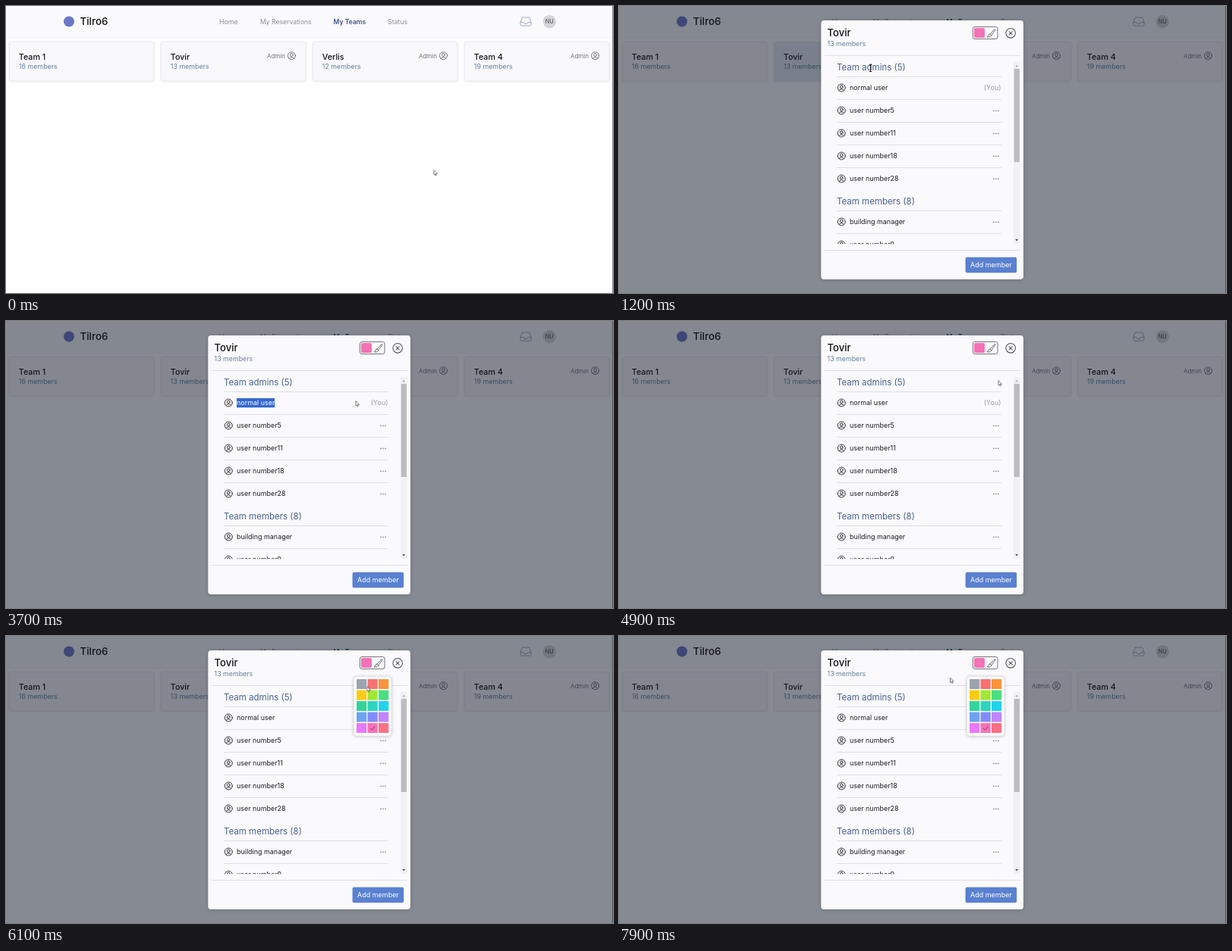
Write an HTML page with a canvas that moves like this. It is 800 px wide and 379 px high and loops after 8 s.

```html
<!DOCTYPE html>
<html lang="en">
<head>
<meta charset="utf-8">
<title>Teams</title>
<style>
html, body { margin: 0; width: 100%; height: 100%; overflow: hidden; background: #fefdff; }
canvas { display: block; width: 100vw; height: 100vh; }
</style>
</head>
<body>
<canvas id="stage"></canvas>
<script>
const W = 800, H = 379, LOOP = 8000, STEP = 100;
const OPEN = 1200, PICKER = 5700, SELECT = [2000, 4000];
const INK = '#111', MUTED = '#64809f', HEADING = '#48608f';
const canvas = document.getElementById('stage');
const ctx = canvas.getContext('2d');
const ratio = window.devicePixelRatio || 1;
canvas.width = W * ratio;
canvas.height = H * ratio;

// time, x, y, pointer shape
const path = [
  [0, 564, 217, 'arrow'], [100, 564, 217, 'arrow'], [1000, 331.7, 80, 'arrow'],
  [1100, 331.7, 80, 'hand'], [1200, 331.5, 82, 'beam'], [1500, 322, 95, 'arrow'],
  [1900, 301, 107, 'beam'], [2700, 490, 106, 'arrow'], [2900, 490, 106, 'arrow'],
  [3300, 453, 107, 'arrow'], [3700, 461, 106, 'arrow'], [3800, 462, 106, 'arrow'],
  [4400, 493, 96, 'arrow'], [4500, 493, 96, 'arrow'], [4900, 500, 79, 'arrow'],
  [5400, 488, 37, 'hand'], [5700, 488, 37, 'hand'], [5900, 482, 55, 'arrow'],
  [6100, 476, 67, 'arrow'], [6300, 472, 76, 'arrow'], [6600, 497, 82, 'arrow'],
  [6900, 468, 110, 'arrow'], [7200, 484, 90, 'arrow'], [7800, 436.5, 55.5, 'arrow'],
  [8000, 436.5, 55.5, 'arrow']
];
const cards = [['Team 1', 16, false], ['Tovir', 13, true], ['Verlis', 12, true], ['Team 4', 19, true]];
const admins = ['normal user', 'user number5', 'user number11', 'user number18', 'user number28'];
const swatches = [
  '#9ca3af', '#f87171', '#fb923c', '#facc15', '#a3e635', '#4ade80', '#34d399', '#2dd4bf',
  '#22d3ee', '#6ea3f2', '#818cf8', '#c084fc', '#e879f9', '#f472b6', '#fb7185'
];

function text(str, x, y, size, color, weight = 400, align = 'left') {
  ctx.font = `${weight} ${size}px Inter, "Open Sans", sans-serif`;
  ctx.textAlign = align;
  ctx.fillStyle = color;
  ctx.fillText(str, x, y);
}

function box(x, y, w, h, r, fill, stroke) {
  ctx.beginPath();
  ctx.roundRect(x, y, w, h, r);
  if (fill) { ctx.fillStyle = fill; ctx.fill(); }
  if (stroke) { ctx.strokeStyle = stroke; ctx.lineWidth = 1; ctx.stroke(); }
}

function shadowBox(x, y, w, h, r, fill, blur, alpha) {
  ctx.save();
  ctx.shadowColor = `rgba(0,0,0,${alpha})`;
  ctx.shadowBlur = blur * ratio;
  ctx.shadowOffsetY = 0.5 * ratio;
  box(x, y, w, h, r, fill);
  ctx.restore();
}

function disc(x, y, r, fill) {
  ctx.beginPath();
  ctx.arc(x, y, r, 0, 7);
  ctx.fillStyle = fill;
  ctx.fill();
}

function strokePath(d, color, width, x = 0, y = 0) {
  ctx.save();
  ctx.translate(x, y);
  ctx.strokeStyle = color;
  ctx.lineWidth = width;
  ctx.lineCap = ctx.lineJoin = 'round';
  ctx.stroke(new Path2D(d));
  ctx.restore();
}

function rule(x1, x2, y, color = '#dfdfe4') {
  ctx.fillStyle = color;
  ctx.fillRect(x1, y, x2 - x1, 1);
}

function userIcon(x, y, color) {
  strokePath('M5 0A5 5 0 1 1-5 0A5 5 0 1 1 5 0M1.9-1.2A1.9 1.9 0 1 1-1.9-1.2A1.9 1.9 0 1 1 1.9-1.2' +
    'M-3.3 3.6Q-2.6 1.8 0 1.8T3.3 3.6', color, 0.9, x, y);
}

function header() {
  ctx.fillStyle = '#faf9fc';
  ctx.fillRect(0, 0, W, 42);
  rule(0, W, 42, '#f5f4f8');
  disc(83, 20.5, 7, '#6b78c8');
  text('Tilro6', 97.5, 25.2, 13.4, INK, 500);
  const nav = '#8f8f97';
  text('Home', 281, 23.8, 8.8, nav);
  text('My Reservations', 335, 23.8, 8.6, nav);
  text('My Teams', 431.5, 23.8, 8.6, '#3d5586', 600);
  text('Status', 503, 23.8, 8.8, nav);
  strokePath('M-7 1L-4.8-5.4H4.8L7 1V4.2Q7 5.6 5.6 5.6H-5.6Q-7 5.6-7 4.2ZM-7 1H-3L-1.8 3H1.8L3 1H7',
    '#9badc9', 1, 685, 20.5);
  disc(716.3, 20.7, 8.6, '#d5d5d7');
  text('NU', 716.3, 23.4, 7.3, '#484848', 400, 'center');
}

function card([name, count, admin], i, hovered) {
  const x = 4 + i * 200;
  shadowBox(x, 47, 191.5, 52.5, 3.5, hovered ? '#e6eaf1' : '#f9f8fb', 2.5, 0.1);
  box(x + 0.5, 47.5, 190.5, 51.5, 3, null, hovered ? '#e1e5ed' : '#ebebf0');
  text(name, x + 12.8, 70.6, 10.7, INK, 500);
  text(count + ' members', x + 12.8, 83.4, 8.9, MUTED);
  if (admin) {
    text('Admin', x + 164, 68.5, 8, '#74747d', 400, 'right');
    userIcon(x + 172.5, 65.7, '#66666f');
  }
}

function row(name, y, you) {
  userIcon(293.3, y, '#222');
  text(name, 304, y + 3, 8.95, '#1c1c1e');
  if (you) text('(You)', 503.5, y + 3, 9, '#9a9aa0', 400, 'right');
  else for (let i = 0; i < 3; i++) disc(494 + i * 3, y + 0.3, 0.85, '#85858c');
}

function selection(x) {
  ctx.font = '400 8.95px Inter, "Open Sans", sans-serif';
  const full = ctx.measureText(admins[0]).width;
  const w = Math.max(0, Math.min(x - 304, full));
  ctx.save();
  ctx.beginPath();
  ctx.rect(304, 102, w, 12.5);
  ctx.clip();
  ctx.fillStyle = '#3367d1';
  ctx.fillRect(304, 102, w, 12.5);
  text(admins[0], 304, 111, 8.95, '#fff');
  ctx.restore();
}

function scrollbar() {
  ctx.fillStyle = '#f1f1f3';
  ctx.fillRect(520, 74, 8.5, 240);
  ctx.fillStyle = '#bcbcbf';
  ctx.fillRect(520.7, 83, 7.3, 123);
  ctx.fillStyle = '#a3a3a6';
  ctx.fill(new Path2D('M522.4 80.2H526L524.2 77.8Z'));
  ctx.fillStyle = '#444';
  ctx.fill(new Path2D('M522.4 308H526L524.2 310.6Z'));
}

function dialog(t, pos) {
  ctx.fillStyle = 'rgba(17,24,39,.5)';
  ctx.fillRect(0, 0, W, H);
  shadowBox(266.3, 19, 266.7, 342, 4, '#faf9fc', 5, 0.2);
  text('Tovir', 274.6, 40.3, 13, INK, 500);
  text('13 members', 274.6, 53, 8.8, MUTED);
  rule(271, 529, 65);
  rule(271, 529, 322);

  box(466.5, 27.5, 32.5, 16, 2.5, '#fcfbfd', '#737378');
  box(468, 29, 14, 13, 2, '#f472b6');
  strokePath('M-1.3 1L4.2-5.2Q5.6-6 5.4-4.4L.6 2.4ZM-1.3 1Q-3.6.8-3.7 2.8T-5.4 4.8Q.4 5.8.6 2.4',
    '#606066', 0.9, 490.5, 36);
  strokePath('M6.3 0A6.3 6.3 0 1 1-6.3 0A6.3 6.3 0 1 1 6.3 0M-2-2L2 2M2-2L-2 2', '#55555b', 1.1, 516.2, 35.8);

  ctx.save();
  ctx.beginPath();
  ctx.rect(270, 70, 260, 244.3);
  ctx.clip();
  text('Team admins (5)', 287, 85.2, 11.5, HEADING);
  admins.forEach((name, i) => {
    rule(287, 504, 93 + i * 30);
    row(name, 108 + i * 30, i === 0);
  });
  text('Team members (8)', 287, 262.2, 11.5, HEADING);
  rule(287, 504, 270);
  row('building manager', 285, false);
  rule(287, 504, 300);
  row('user number9', 315.3, false);
  scrollbar();
  ctx.restore();

  if (t >= SELECT[0] && t < SELECT[1]) selection(pos.x);
  box(456.6, 331.8, 67.6, 20.4, 2, '#5a80d1');
  text('Add member', 490.4, 345.2, 9, '#fff', 400, 'center');
  if (t >= PICKER) picker();
}

function picker() {
  shadowBox(458.3, 53.5, 49.7, 78.5, 4, '#fff', 4, 0.25);
  box(458.5, 53.5, 49.5, 78.5, 4, null, '#e3e3e8');
  swatches.forEach((color, i) => {
    box(462 + (i % 3) * 14.5, 57 + Math.floor(i / 3) * 14.5, 13.3, 13, 0.6, color);
  });
  strokePath('M-2.6.6L-.8 2.4L3-1.8', '#8f3565', 1, 483, 121.7);
}

function pointer({ x, y, kind }) {
  if (kind === 'beam') {
    strokePath('M-1.3-4.5H1.3M0-4.5V4.5M-1.3 4.5H1.3', '#222', 1, x, y);
    return;
  }
  const d = kind === 'hand'
    ? 'M-.8.8Q0-.4.8.8V4Q1.9 0 2.1 4.2Q3.3 3.6 3.4 5V7.4L2.6 10H-1.2L-3 7Q-3.1 5.5-1.8 6.4L-.8 7.2Z'
    : 'M0 0V6L1.4 4.9L2.3 7L3.3 6.6L2.4 4.5H4.2Z';
  ctx.save();
  ctx.translate(x, y);
  ctx.fillStyle = '#fff';
  ctx.fill(new Path2D(d));
  ctx.restore();
  strokePath(d, '#55555a', 0.75, x, y);
}

function pointerAt(t) {
  const i = path.findIndex((key, n) => n + 1 < path.length && t < path[n + 1][0]);
  const [t0, x0, y0, kind] = path[i];
  const [t1, x1, y1] = path[i + 1];
  const k = (t - t0) / (t1 - t0);
  const e = k * k * (3 - 2 * k);
  return { x: x0 + (x1 - x0) * e, y: y0 + (y1 - y0) * e, kind };
}

function draw(t) {
  const pos = pointerAt(t);
  const over = t <= OPEN && pos.x > 204 && pos.x < 396 && pos.y < 100;
  if (over && t < OPEN) pos.kind = 'hand';

  ctx.setTransform(ratio, 0, 0, ratio, 0, 0);
  ctx.fillStyle = '#fefdff';
  ctx.fillRect(0, 0, W, H);
  header();
  cards.forEach((c, i) => card(c, i, over && i === 1));
  ctx.fillStyle = '#8b8b90';
  ctx.fillRect(799, 0, 1, H);
  if (t >= OPEN) dialog(t, pos);
  pointer(pos);
}

const start = performance.now();
function tick() {
  const t = Math.max(0, performance.now() - start) % LOOP;
  draw(Math.floor(t / STEP) * STEP);
  requestAnimationFrame(tick);
}
tick();
</script>
</body>
</html>
```
